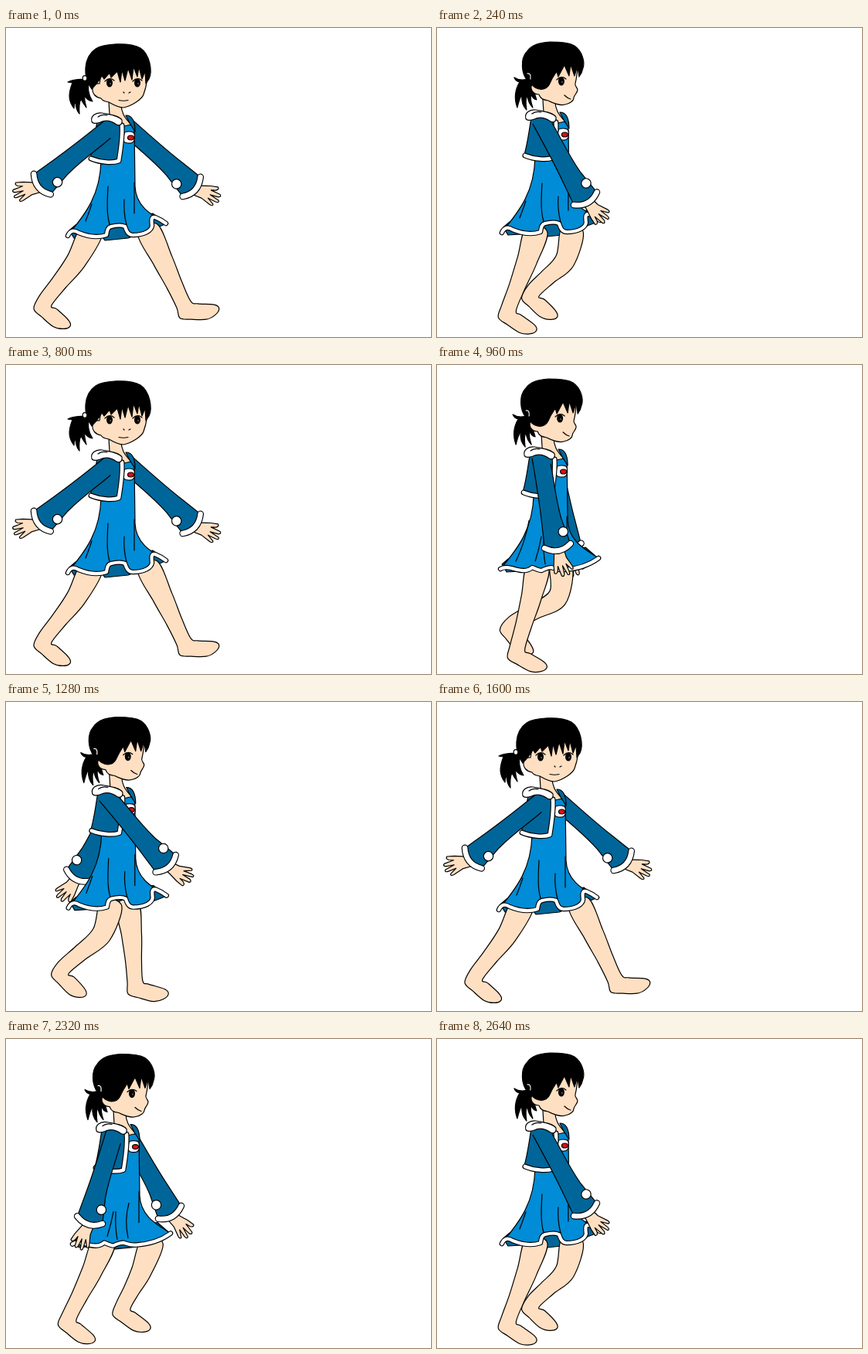
Recreate the animation shown at these times as an HTML page with a canvas. Size 550x400 px, loop 2.72 s.

```html
<!DOCTYPE html>
<html lang="en">
<head>
<meta charset="utf-8">
<title>Walk cycle</title>
<style>
html, body { margin: 0; width: 100%; height: 100%; overflow: hidden; background: #fff; }
canvas { display: block; }
</style>
</head>
<body>
<canvas id="stage" width="550" height="400"></canvas>
<script>
const ctx = document.getElementById('stage').getContext('2d');
const STEP = 80, STEPS = 34, CYCLE = 10;
const INK = '#000', SKIN = '#ffdfc1', DRESS = '#008cd6', JACKET = '#006699', WHITE = '#fff';

// Key poses of one leg; the steps between them are blended
const HIP_Y = 260, KNEE_Y = 301;
const STRIDE = [
  { at: 0, hip: 183, knee: 203, ankle: [230, 358], foot: 6 },
  { at: 2, hip: 131, knee: 122, ankle: [104, 366], foot: 34 },
  { at: 4, hip: 128, knee: 111, ankle: [82, 359], foot: 44 },
  { at: 5, hip: 112, knee: 91, ankle: [51, 353], foot: 46 },
  { at: 7, hip: 161, knee: 156, ankle: [98, 335], foot: 56 },
  { at: 9, hip: 190, knee: 175, ankle: [152, 345], foot: 41 }
];
STRIDE.push({ ...STRIDE[0], at: CYCLE });

const mix = (a, b, t) => a + (b - a) * t;

function shape(d, fill, line = INK, width = 1.2) {
  const path = new Path2D(d);
  if (fill) { ctx.fillStyle = fill; ctx.fill(path); }
  if (line) { ctx.strokeStyle = line; ctx.lineWidth = width; ctx.stroke(path); }
}

// White edging with an ink outline
function trim(d, width) {
  shape(d, null, INK, width + 2.3);
  shape(d, null, WHITE, width);
}

function oval(x, y, rx, ry, fill, line) {
  ctx.beginPath();
  ctx.ellipse(x, y, rx, ry, 0, 0, 7);
  ctx.fillStyle = fill;
  ctx.fill();
  if (line) { ctx.strokeStyle = line; ctx.lineWidth = 1.2; ctx.stroke(); }
}

function group(x, y, draw) {
  ctx.save();
  ctx.translate(x, y);
  draw();
  ctx.restore();
}

// Closed Catmull-Rom curve
function smooth(points) {
  const n = points.length, at = i => points[(i + n) % n];
  const handle = (i, from, to) => [0, 1].map(k => at(i)[k] + (at(to)[k] - at(from)[k]) / 6);
  return points.reduce((d, p, i) =>
    `${d}C${handle(i, i - 1, i + 1)} ${handle(i + 1, i + 2, i)} ${at(i + 1)}`, `M${points[0]}`) + 'Z';
}

function leg(phase) {
  const i = STRIDE.findIndex(key => key.at > phase);
  const a = STRIDE[i - 1], b = STRIDE[i], t = (phase - a.at) / (b.at - a.at);
  const hip = [mix(a.hip, b.hip, t), HIP_Y];
  const knee = [mix(a.knee, b.knee, t), KNEE_Y];
  const ankle = a.ankle.map((v, k) => mix(v, b.ankle[k], t));
  const shin = knee.map((v, k) => mix(v, ankle[k], 0.55));
  const foot = mix(a.foot, b.foot, t) * Math.PI / 180;
  const cos = Math.cos(foot), sin = Math.sin(foot);

  // Point at a distance in front of or behind a joint, square to the limb
  const beside = (p, from, to, gap) => {
    const dx = to[0] - from[0], dy = to[1] - from[1], len = Math.hypot(dx, dy);
    return [p[0] + dy / len * gap, p[1] - dx / len * gap];
  };
  const side = s => [
    beside(hip, hip, knee, 14 * s), beside(knee, hip, ankle, 13 * s),
    beside(shin, knee, ankle, 10.5 * s), beside(ankle, knee, ankle, 10 * s)
  ];
  const sole = [[18, -3], [39, -4], [46, 0], [42, 9], [31, 16], [12, 18], [-3, 18]]
    .map(([x, y]) => [ankle[0] + x * cos - y * sin, ankle[1] + x * sin + y * cos]);
  shape(smooth([...side(1), ...sole, ...side(-1).reverse()]), SKIN);
}

function arm(x, y, degrees, mirror) {
  const angle = -degrees * Math.PI / 180;
  group(x, y, () => {
    ctx.rotate(angle);
    ctx.scale(mirror, 1);
    group(0, 117, () => {
      ctx.rotate(angle * mirror / 2);
      shape('M-6,0C-8,8 -10,12 -12,18L-14,27Q-12,30 -9,26L-7,20L-6,33Q-4,36 -2,32L-1,21L2,34Q5,36 5,31L4,20L9,29Q12,30 11,25L7,12L7,0', SKIN);
    });
    shape('M-9,-6C-10,20 -11,50 -14,80L-17,112Q0,124 17,112L12,78C10,50 13,30 13,6', JACKET);
    trim('M-17,111Q0,124 17,112', 6.5);
    oval(11, 95, 6.2, 6.2, WHITE, INK);
  });
}

// The hem runs from the left corner to the right one
function skirt(swirl) {
  const hem = swirl
    ? 'M80,269C83,262 88,261 94,265C106,270 118,272 130,268C131,261 132,258 136,257C144,255 150,255 154,257C156,263 158,268 164,268C180,268 188,262 189,256C188,248 188,244 193,245C198,247 203,250 207,253'
    : 'M80,268C86,264 94,267 102,269C110,271 116,271 121,266C126,268 130,270 133,270C138,268 140,266 146,266C152,268 156,270 162,269C180,268 196,262 207,254';
  const folds = swirl
    ? 'M132,205C131,225 130,240 134,254M153,222C152,235 154,247 156,255M111,228Q107,240 103,250'
    : 'M117,205C113,228 107,242 100,258M133,226Q130,242 125,258M136,226Q135,247 138,262M153,215Q147,237 152,260';
  return { hem, folds: folds + 'M166,200V240' };
}

function dress({ hem, folds }) {
  shape(hem + 'C190,243 168,232 167,205L166,128L150,120L123,172C122,215 104,240 80,268Z', DRESS);
  shape(folds);
  trim(hem, 4.2);
}

function torso() {
  shape('M133,95L134,112C142,118 150,122 153,127L162,125C152,115 149,108 149,98', SKIN);
  shape('M155,113C163,113 167,120 167,134L160,123Z', JACKET);
  shape('M153,137C153,133 165,133 166,137C168,147 164,150 158,149C151,149 151,144 153,137Z', WHITE);
  oval(161.5, 142, 4, 3, '#d8101c', INK);
  shape('M118,120C115,140 113,155 109,168C122,174 138,174 147,172L150,128L140,114Z', JACKET);
  trim('M110,169C122,174 138,175 146,172C148,160 151,140 150,126', 4.6);
}

function hood() {
  shape('M111,121C109,114 116,109 124,110C133,112 146,113 150,119C151,125 147,127 143,125C136,120 128,119 122,122C117,124 112,124 111,121Z', WHITE);
  shape('M119,115Q124,111 131,113');
}

function eye(x, y) {
  oval(x, y, 4, 5.6, INK);
  oval(x + 1, y + 1, 1, 1.3, '#555');
  shape(`M${x - 6},${y - 2}Q${x},${y - 8} ${x + 6},${y - 3}`);
}

function frontHead() {
  shape('M107,67C98,66 88,66 80,70L86,71C80,86 81,95 88,104Q88,98 90,94C90,102 92,108 95,111Q94,98 97,92Q100,98 104,103Q101,92 102,88Q105,94 112,95C106,86 106,78 107,67Z', INK);
  shape('M121,72C110,70 107,88 123,91C125,95 129,95 133,96C140,100 147,103 152,103C163,101 176,92 178,86C181,78 184,68 183,50L125,48Z', SKIN);
  eye(134, 71);
  eye(170, 71);
  shape('M146,93.5Q152,95 158,93.5M159,84L161,83M152,83L153,84');
  shape('M111,79C99,64 100,38 116,27C126,20 160,18 174,26C186,34 190,56 185,66L181,72L180,56L176,66L172,50L170,63L165,50L163,67L158,52L154,68L150,54L148,70L144,56L136,64L134,58L127,66L124,62C120,70 117,72 111,79Z', INK);
  oval(102, 65, 2.8, 3.4, WHITE, INK);
}

function sideHead() {
  shape('M119,68C110,72 102,72 96,68Q98,73 103,74C97,84 96,96 100,107Q103,95 106,90C105,100 109,107 112,110Q110,96 113,92C114,100 118,105 120,107Q116,95 118,90Q120,96 125,97Q121,85 119,68Z', INK);
  shape('M120,76C116,80 118,90 128,90C130,96 134,97 140,98C148,102 155,105 162,103C168,102 173,98 173,95C173,91 178,88 178,84C178,81 174,79 175,76C177,68 178,60 178,50L130,45Z', SKIN);
  eye(157, 73);
  shape('M161,91Q165,95 169,96');
  shape('M113,72C105,62 104,44 112,35C119,25 130,23 142,22C158,22 168,23 174,27C184,34 188,48 185,56Q184,62 180,67L178,53L174,66L169,51L167,66L161,52L153,67L151,60L146,68C143,72 142,81 134,83C128,84 122,82 118,76Z', INK);
  shape('M113,63Q118,62 117,70', null, WHITE);
}

function draw(step) {
  const phase = step % CYCLE, half = phase % 5;
  const swing = Math.min(phase, CYCLE - phase) / 5;
  const ease = (1 - swing) ** 2;
  const sway = 0.75 * half ** 1.5;
  const bounce = -4.2 * Math.sin(Math.PI * half / 5);
  const cloth = skirt(phase === 0 || swing > 0.5 && swing < 1);

  ctx.fillStyle = WHITE;
  ctx.fillRect(0, 0, 550, 400);
  group(sway, bounce, () => {
    arm(mix(144, 160, ease), 128, mix(46, -46, swing), -1);
    shape('M82,262L88,272L104,271L122,267L128,275L158,272L196,258L206,254L190,240L90,255Z', JACKET);
  });
  leg((phase + 5) % CYCLE);
  leg(phase);
  group(sway, bounce, () => {
    dress(cloth);
    torso();
    arm(131, 129, mix(46, -49, ease), 1);
    hood();
    phase ? sideHead() : frontHead();
  });
}

ctx.lineCap = ctx.lineJoin = 'round';
function tick() {
  draw(Math.floor(performance.now() / STEP) % STEPS);
  requestAnimationFrame(tick);
}
tick();
</script>
</body>
</html>
```
